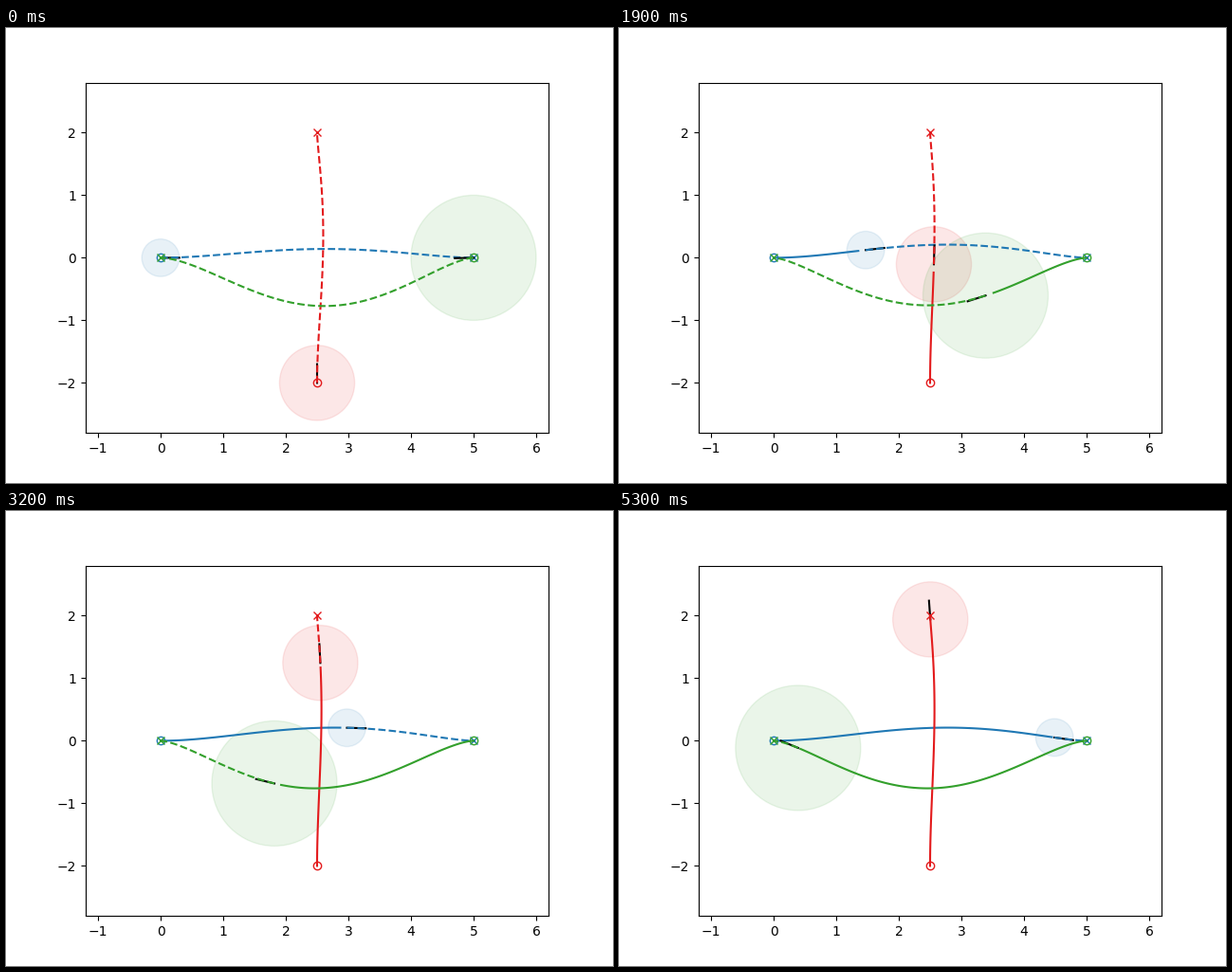
A matplotlib script that plays this animation: 640 by 480 pixels, repeating every 5.4 s.

```python
import numpy as np
import matplotlib.pyplot as plt
from matplotlib.animation import FuncAnimation
from matplotlib.patches import Circle

FRAMES, STEP = 54, 100
HEADING = 0.3
SETTLE = 14  # frames until the plan equals the driven path


def hump(s, a, b):
    """Skewed bump that is 0 at s = 0 and s = 1, with a peak of 1."""
    top = a / (a + b)
    return (s / top) ** a * ((1 - s) / (1 - top)) ** b


class Agent:
    def __init__(self, ax, color, radius, start, goal, bulge, skew, pace, first):
        self.start, self.goal = np.array(start), np.array(goal)
        self.bulge, self.skew = np.array(bulge), skew
        self.pace, self.first = pace, first
        self.disc = ax.add_patch(Circle(start, radius, color=color, alpha=0.1))
        self.nose, = ax.plot([], [], color="black")
        self.trail, = ax.plot([], [], color=color)
        self.plan, = ax.plot([], [], "--", color=color)
        ax.plot(*start, "o", color=color, fillstyle="none")
        ax.plot(*goal, "x", color=color)

    def progress(self, i):
        """Share of the way covered: speeds up from rest, then eases out."""
        return 1 - np.exp(-(max(i, 0) / self.pace) ** 1.83)

    def path(self, s, fresh=0):
        """Points at progress s; fresh = 1 gives the very first plan."""
        s = np.atleast_1d(s)[:, None]
        a, b = self.skew
        gain = 1 + fresh * (self.first - 1)
        straight = self.start + s * (self.goal - self.start)
        return straight + gain * self.bulge * hump(s, a, b + 0.2 * fresh)

    def update(self, i):
        s = self.progress(i)
        here, ahead = self.path([s, s + 0.001])
        self.disc.center = here

        way = ahead - here
        tip = here + HEADING * way / np.hypot(*way)
        self.nose.set_data(*np.transpose([here, tip]))

        past = np.linspace(0, self.progress(i - 1), 120)
        self.trail.set_data(*self.path(past).T)

        rest = np.linspace(s, 1, 120)
        self.plan.set_data(*self.path(rest, max(0, 1 - i / SETTLE)).T)
        return [self.disc, self.nose, self.trail, self.plan]


fig, ax = plt.subplots(figsize=(6.4, 4.8), dpi=100)
ax.set_aspect("equal")
ax.set_xlim(-1.2, 6.2)
ax.set_ylim(-2.8, 2.8)

agents = [
    Agent(ax, "#1f78b4", 0.3, start=(0, 0), goal=(5, 0), bulge=(0, 0.21),
          skew=(2, 1.6), pace=33.8, first=0.67),
    Agent(ax, "#e31a1c", 0.6, start=(2.5, -2), goal=(2.5, 2), bulge=(0.07, 0),
          skew=(2, 1.2), pace=24.2, first=1.4),
    Agent(ax, "#33a02c", 1.0, start=(5, 0), goal=(0, 0), bulge=(0, -0.76),
          skew=(1.6, 1.55), pace=31.8, first=1.015),
]


def update(i):
    return [artist for agent in agents for artist in agent.update(i)]


anim = FuncAnimation(fig, update, frames=FRAMES, interval=STEP,
                     init_func=lambda: update(0), repeat=True, repeat_delay=0)
plt.show()
```
